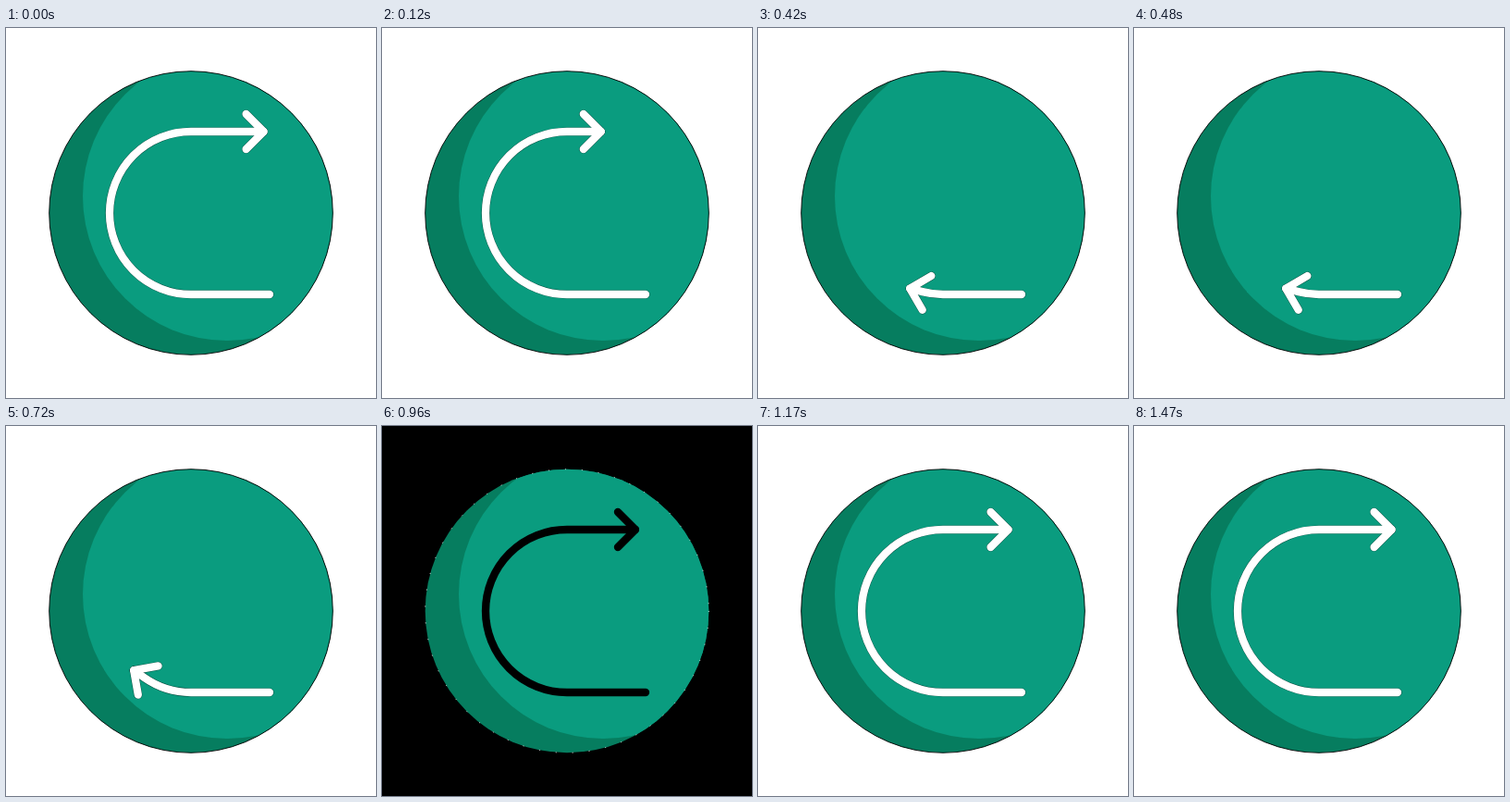
Write an HTML page that moves like this. It is 400x400 px and loops after 3.83 s.

```html
<!DOCTYPE html>
<html lang="en">
<head>
<meta charset="utf-8">
<title>Turning arrow</title>
<style>
  html, body { margin: 0; width: 100%; height: 100%; overflow: hidden; background: #fff; }
  svg { display: block; width: 100%; height: 100%; }
  .line { fill: none; stroke-linecap: round; stroke-linejoin: round; }
</style>
</head>
<body>
<svg viewBox="0 0 400 400">
  <defs>
    <clipPath id="disc"><circle cx="200" cy="200" r="153.3"/></clipPath>
    <g id="arrow" class="line">
      <path id="shaft"/>
      <path id="head" d="M-5 -19 L14 0 L-5 19"/>
    </g>
  </defs>
  <rect id="back" width="400" height="400"/>
  <circle cx="200" cy="200" r="153.3" fill="#067d5f"/>
  <circle cx="239" cy="182" r="156" fill="#0a9c7f" clip-path="url(#disc)"/>
  <circle id="rim" cx="200" cy="200" r="153.3" fill="none" stroke-width="0.9"/>
  <use id="edge" href="#arrow" stroke="#000" stroke-opacity="0.5" stroke-width="9.2"/>
  <use id="ink" href="#arrow" stroke-width="8.3"/>
</svg>
<script>
  const LOOP = 3830, STEP = 30;
  const START_X = 285, CENTER = 200, R = 88, TIP = 14;
  const FLAT = START_X - CENTER, BEND = Math.PI * R;

  // Time in ms and distance of the arrow head along the track
  const KEYS = [
    [0, 426], [375, 107.5], [615, 107.5], [975, 421.5], [1160, 418], [1470, 426]
  ];
  const FLASH = [960, 990];

  const $ = id => document.getElementById(id);
  const ease = u => u < 0.5 ? 4 * u ** 3 : 1 - 4 * (1 - u) ** 3;

  function distance(t) {
    for (let i = 1; i < KEYS.length; i++) {
      const [t0, a] = KEYS[i - 1], [t1, b] = KEYS[i];
      if (t < t1) return a + (b - a) * ease((t - t0) / (t1 - t0));
    }
    return KEYS[KEYS.length - 1][1];
  }

  // Point and turn angle on the track: straight, half circle, straight
  function locate(s) {
    const angle = Math.min(Math.max((s - FLAT) / R, 0), Math.PI);
    const rest = Math.max(s - FLAT - BEND, 0);
    const x = s < FLAT ? START_X - s : CENTER - R * Math.sin(angle) + rest;
    return { x, y: CENTER + R * Math.cos(angle), angle };
  }

  function draw(time) {
    const t = Math.floor(time % LOOP / STEP) * STEP;
    const { x, y, angle } = locate(distance(t));
    const bendX = CENTER - R * Math.sin(angle);
    const tipX = x - TIP * Math.cos(angle), tipY = y - TIP * Math.sin(angle);
    $('shaft').setAttribute('d',
      `M${START_X} ${CENTER + R} H${CENTER} A${R} ${R} 0 0 1 ${bendX} ${y} L${x} ${y} L${tipX} ${tipY}`);
    $('head').setAttribute('transform',
      `translate(${x} ${y}) rotate(${180 + angle * 180 / Math.PI})`);

    const dark = t >= FLASH[0] && t < FLASH[1];
    const paper = dark ? '#000' : '#fff';
    $('back').setAttribute('fill', paper);
    $('ink').setAttribute('stroke', paper);
    $('edge').setAttribute('visibility', dark ? 'hidden' : 'visible');
    $('rim').setAttribute('stroke', dark ? '#fff' : '#000');
    $('rim').setAttribute('stroke-dasharray', dark ? '1 17' : 'none');
  }

  const begin = performance.now();
  function tick() {
    draw(performance.now() - begin);
    requestAnimationFrame(tick);
  }
  tick();
</script>
</body>
</html>
```
